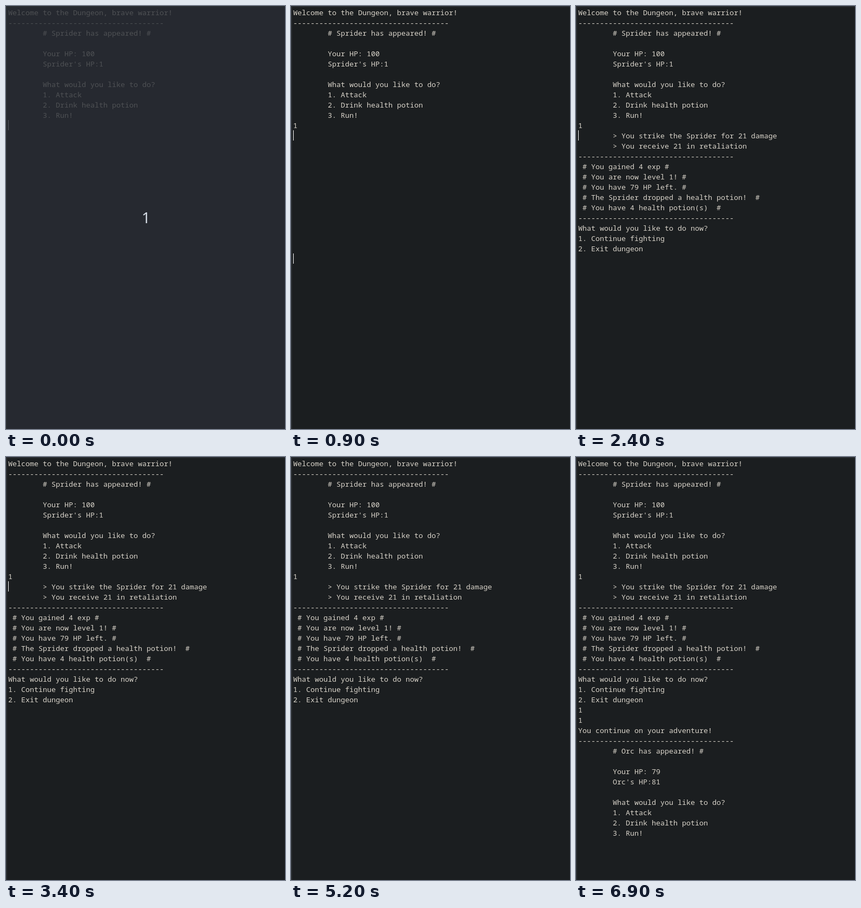
These frames come from a looping animation (516x783 px, 8 s). An HTML page:

```html
<!DOCTYPE html>
<html lang="en">
<head>
<meta charset="utf-8">
<title>Dungeon console</title>
<style>
  html, body { margin: 0; width: 100%; height: 100%; overflow: hidden; background: #1b1e20; }
  #stage { position: relative; width: 516px; height: 783px; overflow: hidden; background: #1b1e20; }
  #stage > * { position: absolute; }
  pre { left: 4px; margin: 1px 0 0; color: #d8d3c9; font: 13.333px/19px "Noto Sans Mono", monospace; }
  .caret { width: 1px; height: 19px; background: #fcfcfc; }
  #frame { inset: 0; border: solid #2a2e32; border-width: 2px 0 0 2px; }
  #veil { inset: 2px 0 0 2px; background: rgba(41, 45, 52, .79); }
  #count { left: 2px; right: 0; top: 372px; text-align: center; color: #d3dae3; font: 28px/38px "Noto Sans", sans-serif; }
</style>
</head>
<body>
<div id="stage"></div>
<script>
const LOOP = 8000, ROW = 19, CELL = 8, LEFT = 4, TOP = 2;
const stage = document.getElementById('stage');
const rule = '-'.repeat(36);
const indent = lines => lines.map(line => line && ' '.repeat(8) + line);

const encounter = (foe, hp, foeHp) => [rule, ...indent([
  `# ${foe} has appeared! #`, '',
  `Your HP: ${hp}`, `${foe}'s HP:${foeHp}`, '',
  'What would you like to do?', '1. Attack', '2. Drink health potion', '3. Run!'
])];

const outcome = [
  ...indent(['> You strike the Sprider for 21 damage', '> You receive 21 in retaliation']),
  rule,
  ' # You gained 4 exp #',
  ' # You are now level 1! #',
  ' # You have 79 HP left. #',
  ' # The Sprider dropped a health potion!  #',
  ' # You have 4 health potion(s)  #',
  rule,
  'What would you like to do now?', '1. Continue fighting', '2. Exit dungeon'
];

function add(tag, props = {}, style = {}) {
  const el = Object.assign(document.createElement(tag), props);
  Object.assign(el.style, style);
  return stage.appendChild(el);
}

// Visible only inside the given [from, to] spans of the loop.
function show(el, ...spans) {
  const steps = [];
  if (spans[0][0] > 0) steps.push([0, 0]);
  for (const [from, to] of spans) {
    steps.push([from, 1]);
    if (to < LOOP) steps.push([to, 0]);
  }
  steps.push([LOOP, steps.at(-1)[1]]);
  const frames = steps.map(([time, opacity]) => ({ offset: time / LOOP, opacity, easing: 'step-end' }));
  el.animate(frames, { duration: LOOP, iterations: Infinity }).startTime = 0;
}

const print = (row, lines, from) =>
  show(add('pre', { textContent: lines.join('\n') }, { top: TOP + row * ROW + 'px' }), [from, LOOP]);

const caret = (row, col, ...spans) =>
  show(add('div', { className: 'caret' }, { left: LEFT + col * CELL + 'px', top: TOP + row * ROW + 'px' }), ...spans);

print(0, ['Welcome to the Dungeon, brave warrior!', ...encounter('Sprider', 100, 1)], 0);
print(11, ['1'], 500);
print(12, outcome, 1400);
print(24, ['1'], 6400);
print(25, ['1'], 6800);
print(26, ['You continue on your adventure!', ...encounter('Orc', 79, 81)], 6900);

caret(11, 0, [0, 200]);
caret(11, 1, [500, 900]);
caret(12, 0, [900, 1400], [2400, 2900], [3400, 4000], [4600, 5200], [5800, 6400]);
caret(24, 0, [900, 1400]);
caret(24, 1, [6400, 6800]);
caret(25, 1, [6800, 6900]);

add('div', { id: 'frame' });
show(add('div', { id: 'veil' }), [0, 200]);
show(add('div', { id: 'count', textContent: '1' }), [0, 200]);
</script>
</body>
</html>
```
